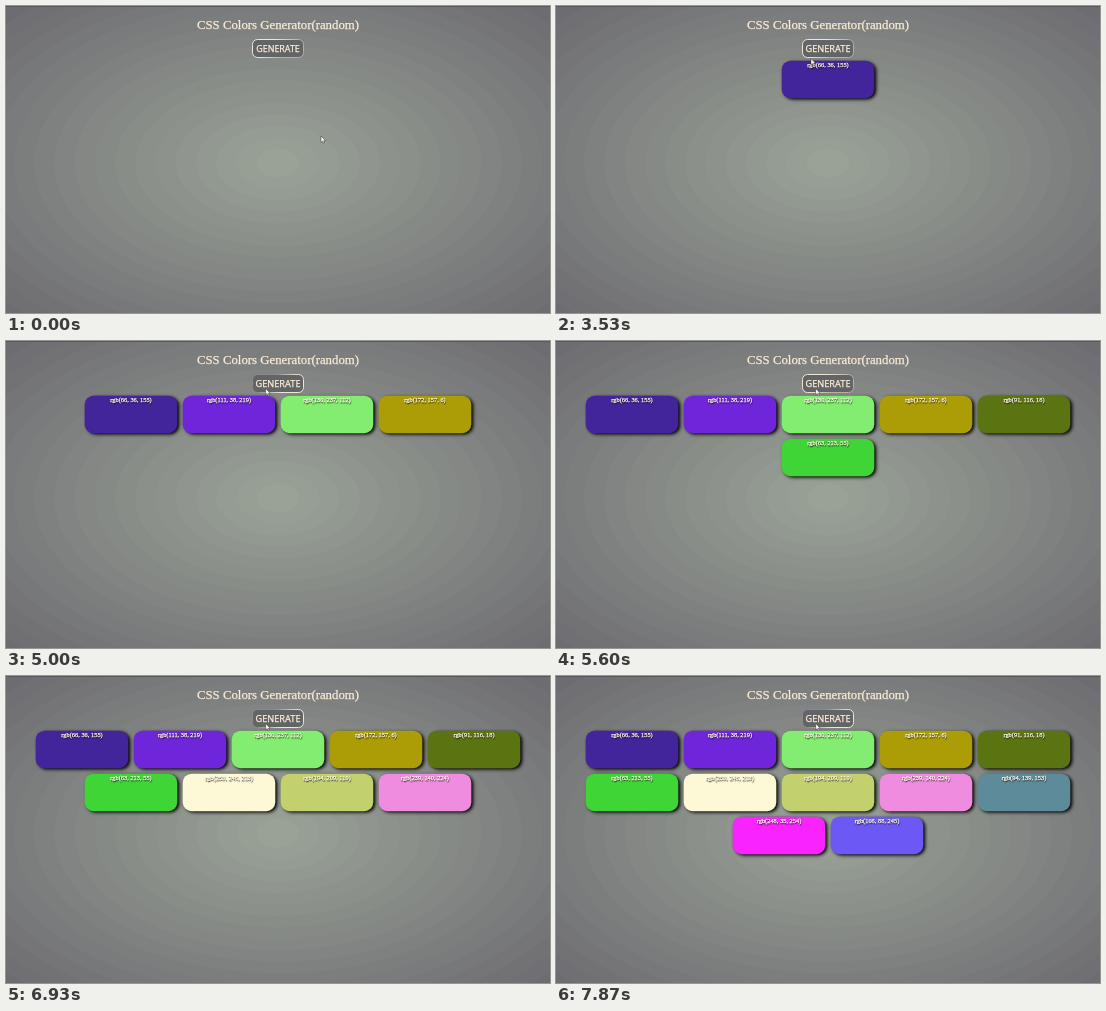
An HTML page with a canvas for the animation above (8000 ms loop, 544 by 307 pixels).

```html
<!DOCTYPE html>
<html lang="en">
<head>
<meta charset="utf-8">
<title>CSS Colors Generator</title>
<style>
  html, body { margin: 0; width: 100%; height: 100%; overflow: hidden; background: #707174; }
  canvas { display: block; }
</style>
</head>
<body>
<canvas id="stage" width="544" height="307"></canvas>
<script>
const W = 544, H = 307, LOOP = 8000, HOLD = 200;
const ctx = document.getElementById('stage').getContext('2d');
const SERIF = '"Liberation Serif", "Times New Roman", serif';
const SANS = '"Noto Sans", "Open Sans", sans-serif';
const CREAM = '#fbecd6';

const colors = [
  '66, 36, 155', '111, 38, 219', '130, 237, 112', '172, 157, 6', '91, 116, 18', '63, 213, 55',
  '253, 248, 213', '194, 209, 110', '239, 140, 224', '94, 139, 153', '248, 35, 254', '108, 88, 245'
].map(c => `rgb(${c})`);

// Key points: time, then values. Clicks come at an even pace between two points.
const clicks = [[0, 0], [3130, 1], [4130, 2], [4800, 4], [6000, 7], [8010, 13]];
const pointer = [
  [0, 315, 130], [1333, 315, 130], [1933, 239, 80], [2200, 251.5, 49],
  [2533, 257.5, 43.5], [3467, 257.5, 43.5], [3533, 255, 52.5], [3800, 259.7, 47.5]
];

const mix = (a, b, k) => a + (b - a) * k;

function valuesAt(keys, t) {
  const i = keys.findIndex(key => key[0] > t);
  if (i < 0) return keys.at(-1).slice(1);
  const [a, b] = [keys[i - 1], keys[i]];
  return a.map((v, n) => mix(v, b[n], (t - a[0]) / (b[0] - a[0]))).slice(1);
}

const cardsAt = t => Math.floor(valuesAt(clicks, t)[0]);

function setShadow(color, x = 0, y = 0, blur = 0) {
  ctx.shadowColor = color;
  ctx.shadowOffsetX = x;
  ctx.shadowOffsetY = y;
  ctx.shadowBlur = blur;
}

function roundRect(x, y, w, h, r, fill) {
  ctx.beginPath();
  ctx.roundRect(x, y, w, h, r);
  ctx.fillStyle = fill;
  ctx.fill();
}

function text(str, x, y, font, color) {
  ctx.font = font;
  ctx.textAlign = 'center';
  ctx.fillStyle = ctx.strokeStyle = color;
  ctx.lineWidth = 0.25;
  ctx.strokeText(str, x, y);
  setShadow('transparent');
  ctx.fillText(str, x, y);
}

function drawBackground() {
  const bands = 19, inner = [155, 163, 152], outer = [108, 107, 112];
  for (let i = bands; i > 0; i--) {
    const r = i / bands * Math.SQRT1_2;
    ctx.fillStyle = `rgb(${inner.map((v, n) => Math.round(mix(v, outer[n], (i - 0.5) / bands)))})`;
    ctx.beginPath();
    ctx.ellipse(W / 2, 157, W * r + 1, H * r + 3, 0, 0, 7);
    ctx.fill();
  }
  ctx.fillStyle = '#58595b';
  ctx.fillRect(0, 0, W, 1);
}

function drawButton(pressed, focused) {
  const edge = ctx.createLinearGradient(262, 33, 282, 53);
  edge.addColorStop(0.2, pressed ? '#8b8a87' : '#f0e6d6');
  edge.addColorStop(0.8, pressed ? '#f0e6d6' : '#b5afa6');
  roundRect(246.5, 33.5, 51, 18, 5, '#626465');
  ctx.strokeStyle = edge;
  ctx.lineWidth = 1;
  ctx.stroke();
  text('GENERATE', 272, 46.3, `${focused ? 9.2 : 8.9}px ${SANS}`, CREAM);
}

function drawCard(i, count) {
  const row = Math.floor(i / 5), inRow = Math.min(5, count - row * 5);
  const x = W / 2 - inRow * 49 + 3 + (i % 5) * 98, y = 54.7 + row * 43;
  setShadow('#000', 2, 1.3, 3.5);
  roundRect(x - 0.3, y, 92.6, 37.5, 9, colors[i]);
  setShadow('#000', 0.5, 0.5, 1);
  text(colors[i], x + 46, y + 6.4, `6.4px ${SERIF}`, '#fff8e4');
}

function drawPointer([x, y]) {
  ctx.beginPath();
  [[0, 0], [0, 6.4], [1.5, 5.1], [2.5, 7.4], [3.5, 7], [2.6, 4.7], [4.5, 4.7]]
    .forEach(([dx, dy]) => ctx.lineTo(x + dx, y + dy));
  ctx.closePath();
  ctx.fillStyle = '#fff';
  ctx.fill();
  ctx.strokeStyle = '#333';
  ctx.lineWidth = 0.5;
  ctx.stroke();
}

function draw(now) {
  const t = now % LOOP + 5;
  const cards = cardsAt(t), pressed = cardsAt(t + HOLD) > cards;
  drawBackground();
  text('CSS Colors Generator(random)', 272, 23, `12.8px ${SERIF}`, CREAM);
  drawButton(pressed, pressed || cards > 0);
  for (let i = 0; i < cards; i++) drawCard(i, cards);
  // The pointer is sampled 15 times a second.
  drawPointer(valuesAt(pointer, Math.floor(t * 0.015) / 0.015));
  requestAnimationFrame(draw);
}
requestAnimationFrame(draw);
</script>
</body>
</html>
```
